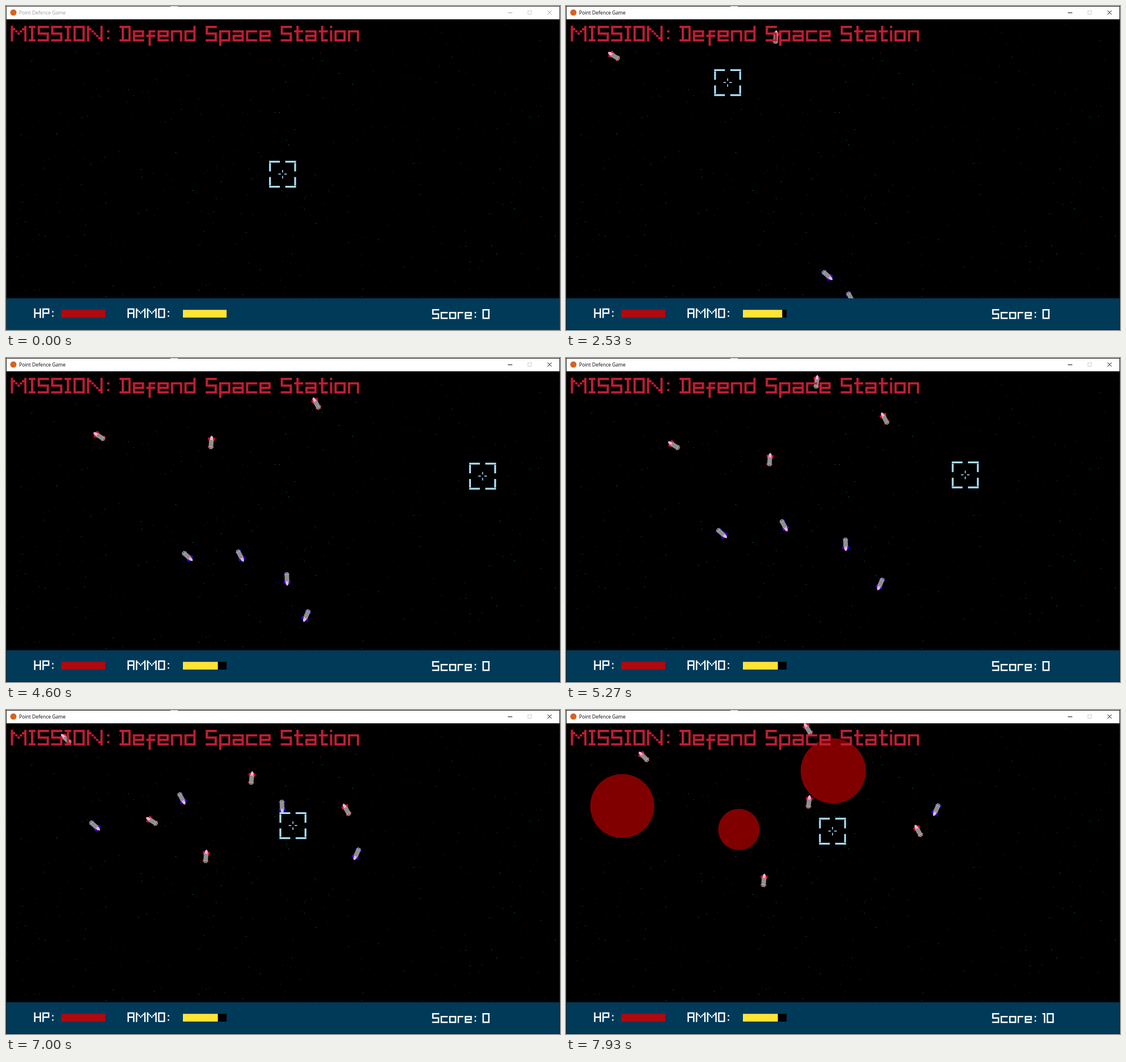
These frames come from a looping animation (977 px wide and 573 px high, 8 s). An HTML page with a canvas:

```html
<!DOCTYPE html>
<html lang="en">
<head>
<meta charset="utf-8">
<title>Point Defence Game</title>
<style>
html, body { margin: 0; width: 100%; height: 100%; overflow: hidden; background: #000; }
canvas { display: block; }
</style>
</head>
<body>
<canvas id="stage" width="977" height="573" role="img"
  aria-label="Point Defence Game. MISSION: Defend Space Station. HP, AMMO, Score"></canvas>
<script>
const W = 977, H = 573, TOP = 23.5, FLOOR = 517;
const LOOP = 8000, TICK = 1000 / 15;
const canvas = document.getElementById('stage');
const ctx = canvas.getContext('2d');

// Pixel letters: width, then strokes as xy grid points
const GLYPHS = {
  M: [7, '06 00 33 60 66'], I: [3, '00 20|10 16|06 26'],
  S: [5, '40 00 03 43 46 06'], O: [5, '00 40 46 06 00'],
  N: [7, '06 00 66 60'], D: [5, '00 40 46 06|10 16'],
  H: [5, '00 06|40 46|03 43'], P: [5, '06 00 40 43 03'],
  A: [5, '06 00 40 46|03 43'], ':': [2, '12 12|15 15'],
  a: [5, '02 42 46 06 04 44'], c: [5, '42 02 06 46'],
  d: [5, '40 46 06 02 42'], e: [5, '46 06 02 42 44 04'],
  f: [4, '32 12 18|04 34'], i: [1, '00 00|02 06'],
  n: [5, '06 02 42 46'], o: [5, '02 42 46 06 02'],
  p: [5, '08 02 42 46 06'], r: [4, '06 02 32'],
  t: [4, '10 16 36|02 32'], 0: [5, '00 40 46 06 00'], 1: [2, '00 10 16']
};

// Reference time (s), position, velocity (px/s), time of destruction
const ships = [
  { blue: false, t: 4.6, x: 164, y: 138, vx: 38.7, vy: 24.2, end: 7.58 },
  { blue: false, t: 4.6, x: 362, y: 149, vx: -3.9, vy: 45.6 },
  { blue: false, t: 4.6, x: 547, y: 80, vx: 22.2, vy: 40 },
  { blue: false, t: 5.87, x: 439, y: 69, vx: -5.1, vy: 45.1 },
  { blue: false, t: 7.93, x: 136.5, y: 82, vx: 33.5, vy: 33.5 },
  { blue: false, t: 7.93, x: 426, y: 33, vx: 24, vy: 39 },
  { blue: true, t: 4.6, x: 320.5, y: 351, vx: -68.1, vy: -60.8, end: 7.4 },
  { blue: true, t: 4.6, x: 413.5, y: 350, vx: -43, vy: -80.5, end: 7.58 },
  { blue: true, t: 4.6, x: 495.5, y: 391, vx: -3.6, vy: -91.7, end: 7.38 },
  { blue: true, t: 4.6, x: 529.5, y: 456, vx: 37, vy: -83.8 }
];

const blasts = [
  { t: 7.4, x: 99.2, y: 169.8 },
  { t: 7.39, x: 471.3, y: 107.7 },
  { t: 7.588, x: 304.9, y: 211.3 }
];
const BLAST_SPEED = 106;

// Crosshair stops: time (s), x, y
const aim = [
  [0, 487.75, 297.5], [0.4, 487.75, 297.5], [1.2, 157, 185.5], [1.6, 157, 185.5],
  [2.4, 285, 135.5], [2.6, 285, 135.5], [4.05, 848, 212], [4.6, 840.5, 209],
  [4.8, 840.5, 209], [5.86, 508.5, 203.5], [7, 506, 204.5], [7.93, 470, 214.3], [8, 470, 214.3]
];

function rect(color, x, y, w, h, g = ctx) {
  g.fillStyle = color;
  g.fillRect(x, y, w, h);
}

function random(seed) {
  return () => (seed = (seed * 16807) % 2147483647) / 2147483647;
}

function pixelText(text, x, y, p, color) {
  ctx.beginPath();
  for (const ch of text) {
    if (ch === ' ') { x += 3.5 * p; continue; }
    const [width, strokes] = GLYPHS[ch];
    for (const stroke of strokes.split('|')) {
      const pts = stroke.split(' ').map(s => [+s[0], +s[1]]);
      for (let i = 1; i < pts.length; i++) {
        const [ax, ay] = pts[i - 1], [bx, by] = pts[i];
        const dx = bx - ax, dy = by - ay;
        if (dx && dy) {
          const n = Math.abs(dx);
          for (let k = 0; k <= n; k++) {
            ctx.rect(x + (ax + dx * k / n) * p, y + (ay + dy * k / n) * p, p, p);
          }
        } else {
          ctx.rect(x + Math.min(ax, bx) * p, y + Math.min(ay, by) * p,
            (Math.abs(dx) + 1) * p, (Math.abs(dy) + 1) * p);
        }
      }
    }
    x += (width + 1) * p;
  }
  ctx.fillStyle = color;
  ctx.fill();
}

function makeSky() {
  const sky = document.createElement('canvas');
  sky.width = W;
  sky.height = H;
  const g = sky.getContext('2d'), rnd = random(4127);
  rect('#000', 0, 0, W, H, g);
  for (let i = 0; i < 1200; i++) {
    const x = Math.floor(rnd() * W), y = Math.floor(TOP + rnd() * (FLOOR - TOP));
    const glow = 30 + 140 * rnd() ** 2.5;
    const color = rnd() < 0.5 ? `rgb(${glow},0,0)` : `rgb(0,${glow},${glow * 0.55})`;
    rect(color, x, y, 1, 1, g);
  }
  return sky;
}
const sky = makeSky();

function drawShip(s, t) {
  if (s.end && t >= s.end) return;
  const fin = s.blue ? '#1414f0' : '#e81018';
  ctx.save();
  ctx.translate(s.x + s.vx * (t - s.t), s.y + s.vy * (t - s.t));
  ctx.rotate(Math.atan2(s.vy, s.vx));
  for (const side of [-1, 1]) {
    rect(fin, -8, side * 4.5 - 1.5, 4, 3);
    rect(fin, -5, side * 4 - 1, 3, 2);
    rect(fin, 7, side * 4 - 1.2, 3, 2.4);
  }
  ctx.fillStyle = '#ffaae0';
  ctx.beginPath();
  ctx.moveTo(-3, -3);
  ctx.lineTo(-9, -2.5);
  ctx.lineTo(-12, 0);
  ctx.lineTo(-9, 2.5);
  ctx.lineTo(-3, 3);
  ctx.fill();
  rect('#8f8f8f', -4, -4, 14, 8);
  rect('#8f8f8f', 10, -3, 2, 6);
  rect('#d0d0d0', 8, -2, 1, 4);
  rect('#303030', 9, -1, 1, 2);
  ctx.restore();
}

function aimAt(t) {
  let i = 1;
  while (i < aim.length - 1 && t > aim[i][0]) i++;
  const a = aim[i - 1], b = aim[i];
  const u = Math.min(1, (t - a[0]) / (b[0] - a[0])), k = u * u * (3 - 2 * u);
  return [a[1] + (b[1] - a[1]) * k, a[2] + (b[2] - a[2]) * k];
}

function drawCrosshair(t) {
  const [cx, cy] = aimAt(t);
  const edge = '#a9e1fb', cross = '#b4dcff';
  const half = 23.75, thick = 3.2;
  for (const side of [-half, half - thick]) {
    rect(edge, cx - half, cy + side, 19, thick);
    rect(edge, cx + half - 19, cy + side, 19, thick);
    rect(edge, cx + side, cy - 20, thick, 15);
    rect(edge, cx + side, cy + 5, thick, 15);
  }
  for (const side of [-7.5, 3]) {
    rect(cross, cx + side, cy - 1, 4.5, 1.6);
    rect(cross, cx - 0.8, cy + side, 1.6, 4.5);
  }
}

function drawBlasts(t) {
  ctx.fillStyle = '#800000';
  for (const b of blasts) {
    if (t <= b.t) continue;
    ctx.beginPath();
    ctx.arc(b.x, b.y, (t - b.t) * BLAST_SPEED, 0, Math.PI * 2);
    ctx.fill();
  }
}

function drawPanel(t) {
  const ammo = t < 2.2 ? 10 : t < 3.33 ? 9 : 8;
  rect('#003a59', 0, FLOOR, W, H - FLOOR);
  pixelText('HP:', 49.5, 534.7, 2.45, '#fff');
  rect('#b00a10', 97.7, 537.3, 77.3, 13.7);
  pixelText('AMMO:', 214.3, 534.7, 2.45, '#fff');
  rect('#000', 312, 537.3, 77, 13.7);
  rect('#ffe436', 312, 537.3, 7.7 * ammo, 13.7);
  pixelText('Score: ' + (t < 7.6 ? 0 : 10), 751.5, 536, 2.5, '#fff');
}

function drawWindow(active) {
  const ink = active ? '#000' : '#999';
  rect('#fff', 0, 0, W, TOP);
  ctx.fillStyle = '#d8641c';
  ctx.beginPath();
  ctx.arc(13, 11.5, 5.5, 0, Math.PI * 2);
  ctx.fill();
  ctx.fillStyle = ink;
  ctx.font = '8.6px "Open Sans", "Noto Sans", sans-serif';
  ctx.fillText('Point Defence Game', 23, 15);
  ctx.lineWidth = 1;
  rect(ink, 885, 11.5, 8, 1);
  ctx.strokeStyle = '#ccc';
  ctx.strokeRect(920.5, 8.5, 6, 6);
  ctx.strokeStyle = ink;
  ctx.beginPath();
  ctx.moveTo(955, 8);
  ctx.lineTo(962, 15);
  ctx.moveTo(962, 8);
  ctx.lineTo(955, 15);
  ctx.stroke();
  ctx.strokeStyle = active ? '#1c1c1c' : '#383838';
  ctx.strokeRect(0.5, 0.5, W - 1, H - 1);
  rect('#bbb', 290, 0, 13, 1);
}

function draw(ms) {
  const t = Math.floor((ms + 4) / TICK) * TICK / 1000;
  ctx.drawImage(sky, 0, 0);
  ctx.save();
  ctx.beginPath();
  ctx.rect(0, TOP, W, FLOOR - TOP);
  ctx.clip();
  ships.forEach(s => drawShip(s, t));
  drawBlasts(t);
  drawCrosshair(t);
  pixelText('MISSION: Defend Space Station', 8.5, 35, 3.95, '#be1e32');
  ctx.restore();
  drawPanel(t);
  drawWindow(t >= 1.06);
}

const start = performance.now();
function frame() {
  draw((performance.now() - start) % LOOP);
  requestAnimationFrame(frame);
}
frame();
</script>
</body>
</html>
```
